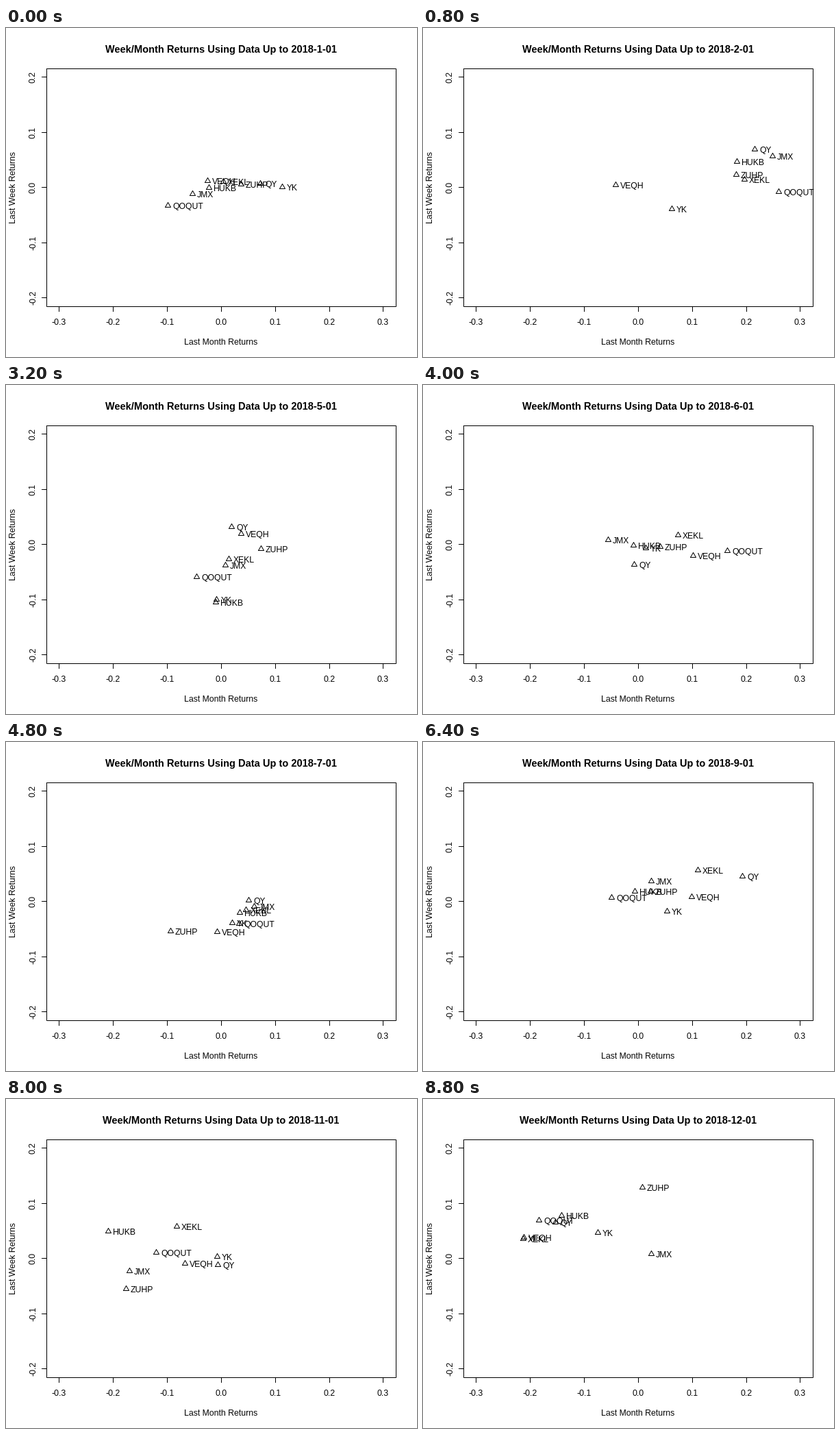
Recreate the animation shown at these times as a matplotlib script. Size 600 px wide and 480 px high, loop 9.6 s.

```python
import matplotlib.pyplot as plt
import numpy as np
from matplotlib.animation import FuncAnimation

plt.rcParams.update({
    "font.family": "Liberation Sans",
    "text.hinting": "native",
    "toolbar": "None",
})

WIDTH, HEIGHT, DPI = 600, 480, 100
INTERVAL = 800
LEFT, RIGHT, TOP, BOTTOM = 59, 569, 59, 406
LABEL_PX, TITLE_PX = 12.2, 14.65

TICKERS = ["HUKB", "JMX", "ZUHP", "VEQH", "QOQUT", "XEKL", "YK", "QY"]

# Extent of each month's cloud: lowest and highest month return, then week return.
CLOUDS = [
    (-.100, .113, -.033, .012),
    (-.043, .259, -.039, .069),
    (-.061, .110, -.013, .042),
    (-.080, -.005, -.063, .026),
    (-.046, .073, -.105, .032),
    (-.056, .165, -.037, .017),
    (-.094, .060, -.055, .001),
    (.023, .095, -.028, .020),
    (-.050, .192, -.018, .056),
    (-.051, .082, -.047, .067),
    (-.210, -.007, -.055, .057),
    (-.214, .024, .008, .128),
]


def to_x(value):
    return 314.4 + 788.15 * value


def to_y(value):
    return 232.8 - 804.4 * value


def fill(values, low, high):
    """Rescale values so that they span low to high."""
    return np.interp(values, (values.min(), values.max()), (low, high))


def returns(month):
    """Month and week returns of all tickers, loosely correlated."""
    rng = np.random.default_rng(month)
    across = rng.normal(size=len(TICKERS))
    along = rng.normal(size=len(TICKERS)) + 0.5 * across
    low_x, high_x, low_y, high_y = CLOUDS[month]
    return fill(across, low_x, high_x), fill(along, low_y, high_y)


fig = plt.figure(figsize=(WIDTH / DPI, HEIGHT / DPI), dpi=DPI, facecolor="white")
ax = fig.add_axes([0, 0, 1, 1])
ax.set_xlim(0, WIDTH)
ax.set_ylim(HEIGHT, 0)
ax.axis("off")


def stroke(xs, ys, join="miter"):
    return ax.plot(xs, ys, color="black", lw=72 / DPI, snap=True,
                   solid_capstyle="projecting", solid_joinstyle=join)[0]


def write(x, y, text, px=LABEL_PX, **style):
    style = {"ha": "center", "va": "baseline", "color": "black", **style}
    return ax.text(x, y, text, fontsize=px * 72 / DPI,
                   rotation_mode="anchor", **style)


def draw_axes():
    stroke([LEFT, RIGHT, RIGHT, LEFT, LEFT], [TOP, TOP, BOTTOM, BOTTOM, TOP])
    for tenth in range(-3, 4):
        x = int(to_x(tenth / 10))
        stroke([x, x], [BOTTOM, BOTTOM + 7])
        write(x, 433, f"{tenth / 10:.1f}")
    for tenth in range(-2, 3):
        y = int(to_y(tenth / 10))
        stroke([LEFT - 7, LEFT], [y, y])
        write(43, y, f"{tenth / 10:.1f}", rotation=90)
    write(313.5, 462, "Last Month Returns")
    write(14, 232.5, "Last Week Returns", rotation=90)


draw_axes()
title = write(314, 36, "", TITLE_PX, weight="bold")
markers = [stroke([], [], "round") for _ in TICKERS]
labels = [write(0, 0, name, ha="left") for name in TICKERS]


def update(month):
    title.set_text(f"Week/Month Returns Using Data Up to 2018-{month + 1}-01")
    for marker, label, across, along in zip(markers, labels, *returns(month)):
        x, y = round(to_x(across)), int(to_y(along))
        marker.set_data([x - 4, x + 4, x, x - 4], [y + 2, y + 2, y - 5, y + 2])
        label.set_position((x + 7, y + 5))
    return [title, *markers, *labels]


anim = FuncAnimation(fig, update, frames=len(CLOUDS), interval=INTERVAL,
                     repeat=True, repeat_delay=0, blit=False)
plt.show()
```
